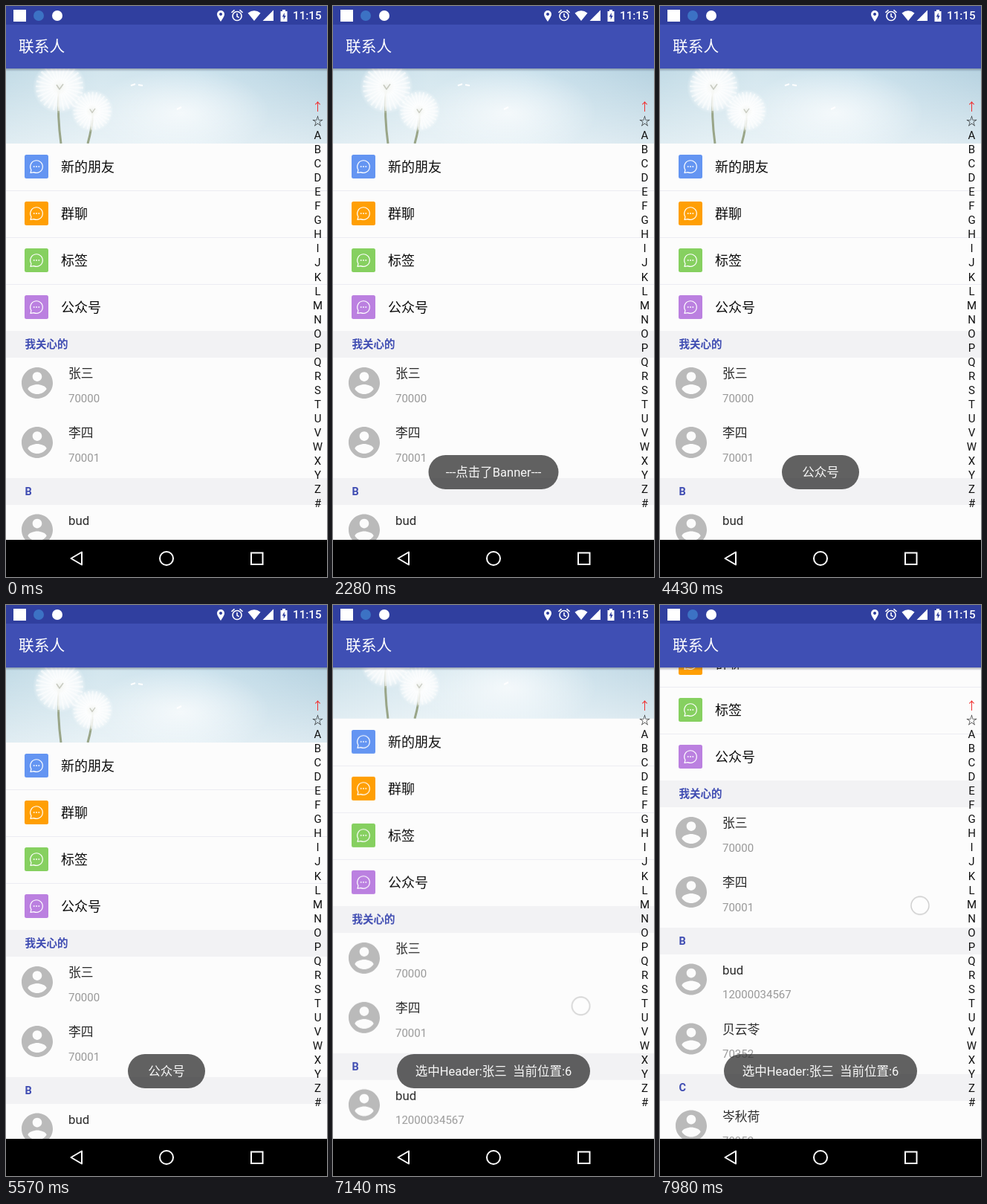
These frames come from a looping animation (432x768 px, 8000 ms). An HTML page:

```html
<!DOCTYPE html>
<html lang="zh-CN">
<head>
<meta charset="utf-8">
<title>联系人</title>
<style>
html, body { margin: 0; width: 100%; height: 100%; overflow: hidden; background: #000; }
svg#stage { display: block; width: 100vw; height: 100vh; }
text { font-family: Roboto, "Noto Sans CJK SC", "Noto Sans CJK", sans-serif; white-space: pre; }
.mid { text-anchor: middle; }
.list, .glow, .wave, .toast, .finger { animation: 8s linear infinite; }

.list { animation-name: scroll; }
@keyframes scroll {
  0%, 88.5% { transform: none; animation-timing-function: cubic-bezier(.333, .85, .667, .94); }
  100% { transform: translateY(-201.8px); }
}

/* Row feedback: a flat tint plus a growing circle */
.glow { animation-name: glow; opacity: 0; }
.wave { animation-name: wave; opacity: 0; }
@keyframes glow {
  0% { opacity: 0; }
  1%, 3.75% { opacity: 1; }
  6.25%, 100% { opacity: 0; }
}
@keyframes wave {
  0% { transform: scale(0); opacity: 1; }
  1.9% { opacity: 1; }
  5% { opacity: 0; }
  6.25%, 100% { transform: scale(1.8); opacity: 0; }
}

.toast { opacity: 0; }
.t1 { animation-name: toast1; }
.t2 { animation-name: toast2; }
.t3 { animation-name: toast3; }
@keyframes toast1 {
  0%, 12.5% { opacity: 0; animation-timing-function: cubic-bezier(.2, .6, .5, 1); }
  17.5%, 35.43% { opacity: 1; }
  35.44%, 100% { opacity: 0; }
}
@keyframes toast2 {
  0%, 35.43% { opacity: 0; transform: translateX(-36px); }
  35.44% { opacity: 1; transform: translateX(-36px); animation-timing-function: cubic-bezier(.22, 1, .36, 1); }
  40.44%, 76.8% { opacity: 1; transform: none; }
  76.81%, 100% { opacity: 0; transform: none; }
}
@keyframes toast3 {
  0%, 76.8% { opacity: 0; transform: translateX(78px); }
  76.81% { opacity: 1; transform: translateX(78px); animation-timing-function: cubic-bezier(.22, 1, .36, 1); }
  81.81%, 100% { opacity: 1; transform: none; }
}

.finger { animation-name: finger; opacity: 0; }
@keyframes finger {
  0%, 34% { opacity: 0; transform: translate(236px, 405px); }
  34.01%, 35.2% { opacity: 1; transform: translate(236px, 405px); }
  35.21%, 75.3% { opacity: 0; transform: translate(267px, 513px); }
  75.31%, 76.5% { opacity: 1; transform: translate(267px, 513px); }
  76.51%, 86.7% { opacity: 0; transform: translate(325px, 610px); }
  86.71%, 87.3% { opacity: 1; transform: translate(325px, 610px); animation-timing-function: cubic-bezier(.333, .85, .667, .94); }
  100% { opacity: 1; transform: translate(350px, 403.5px); }
}
</style>
</head>
<body>
<svg id="stage" viewBox="0 0 432 768">
  <defs>
    <linearGradient id="sky">
      <stop offset="0" stop-color="#c2dbe6"/>
      <stop offset=".3" stop-color="#d3e6ee"/>
      <stop offset=".6" stop-color="#cbe2ed"/>
      <stop offset="1" stop-color="#b6d2e0"/>
    </linearGradient>
    <linearGradient id="mist" x2="0" y2="1">
      <stop offset="0" stop-color="#fff" stop-opacity="0"/>
      <stop offset="1" stop-color="#fff" stop-opacity=".5"/>
    </linearGradient>
    <radialGradient id="puff">
      <stop offset="0" stop-color="#f1f3ee"/>
      <stop offset=".3" stop-color="#fff" stop-opacity=".9"/>
      <stop offset=".7" stop-color="#fff" stop-opacity=".7"/>
      <stop offset="1" stop-color="#fff" stop-opacity="0"/>
    </radialGradient>
    <radialGradient id="haze">
      <stop offset="0" stop-color="#fff" stop-opacity=".7"/>
      <stop offset="1" stop-color="#fff" stop-opacity="0"/>
    </radialGradient>
    <linearGradient id="shade" x2="0" y2="1">
      <stop offset="0" stop-color="#333a50" stop-opacity=".4"/>
      <stop offset="1" stop-color="#333a50" stop-opacity="0"/>
    </linearGradient>
    <g id="bubble" fill="none" stroke="#fff" stroke-width="1.2">
      <path d="M-7 4.5A8.3 8.3 0 1 1-3.5 7.6L-8 8.3Z" stroke-linejoin="round"/>
      <path d="M-4.2 0h1.8M-.9 0h1.8M2.4 0h1.8" stroke-width="1.5"/>
    </g>
    <g id="dandelion">
      <circle r="36" fill="url(#puff)"/>
      <circle r="18" fill="none" stroke="#fff" stroke-opacity=".55" stroke-width="28" stroke-dasharray="1.5 2.5"/>
      <path d="M-4-3L0 3L5-4" fill="none" stroke="#a9ab9c" stroke-width="1.5" opacity=".6"/>
    </g>
    <path id="person" fill-rule="evenodd" transform="scale(2.1) translate(-12 -12)" d="M12 2C6.48 2 2 6.48 2 12s4.48 10 10 10 10-4.48 10-10S17.52 2 12 2zm0 3c1.66 0 3 1.34 3 3s-1.34 3-3 3-3-1.34-3-3 1.34-3 3-3zm0 14.2c-2.5 0-4.71-1.28-6-3.22.03-1.99 4-3.08 6-3.08 1.99 0 5.97 1.09 6 3.08-1.29 1.94-3.5 3.22-6 3.22z"/>
  </defs>

  <rect width="432" height="768" fill="#fcfcfc"/>
  <g class="list">
    <svg y="84" width="432" height="101">
      <rect width="432" height="101" fill="url(#sky)"/>
      <rect width="432" height="101" fill="url(#mist)"/>
      <ellipse cx="235" cy="60" rx="120" ry="60" fill="url(#haze)"/>
      <g fill="none" stroke="#99a588" stroke-width="3">
        <path d="M71 30Q69 65 74 101"/>
        <path d="M117 58Q116 80 110 101"/>
      </g>
      <use href="#dandelion" x="72" y="25"/>
      <use href="#dandelion" transform="translate(116 57) scale(.8)"/>
      <path d="M168 23l6-2M178 22l6 1M230 55l6-3" stroke="#fff" stroke-width="2"/>
    </svg>
    <g id="rows"></g>
  </g>

  <g id="index"></g>
  <g id="toasts"></g>

  <rect y="84" width="432" height="4" fill="url(#shade)"/>
  <rect y="25" width="432" height="59" fill="#3f4fb4"/>
  <rect width="432" height="25" fill="#303f9f"/>
  <g id="bar" fill="#fff">
    <rect x="10" y="5" width="17" height="16"/>
    <circle cx="44" cy="13" r="7" fill="#3c72c4"/>
    <circle cx="69" cy="13" r="7"/>
    <path fill-rule="evenodd" d="M289 21C285 15 284 13 284 11a5 5 0 0 1 10 0C294 13 293 15 289 21ZM289 9a2 2 0 1 0 .01 0Z"/>
    <g fill="none" stroke="#fff" stroke-width="1.6">
      <circle cx="311" cy="13.5" r="6"/>
      <path d="M311 10v4l2.6 1.6M303.5 8.8l4-3.4M318.5 8.8l-4-3.4"/>
    </g>
    <path d="M325.5 9.5Q334 3 342.5 9.5L334 20Z"/>
    <path d="M345.5 20L360 5.5V20Z"/>
    <path fill-rule="evenodd" d="M369.5 7h2.5V5h4v2h2.5v14h-9ZM374.7 9l-3 5.5h2v4l3-5.5h-2Z"/>
  </g>

  <rect y="718" width="432" height="50"/>
  <g fill="none" stroke="#fff" stroke-width="2">
    <path d="M87.5 743L102 734.5V751.5Z" stroke-linejoin="round"/>
    <circle cx="216" cy="743" r="9"/>
    <rect x="330" y="735.5" width="15.5" height="15.5"/>
  </g>

  <g class="finger">
    <circle r="12" fill="#fff" fill-opacity=".3" stroke="#cbcbcb" stroke-width="1.4"/>
  </g>
</svg>

<script>
const loop = 8000;
const at = id => document.getElementById(id);

// Text placed by its vertical centre
const label = (x, cy, size, str, attrs = '') =>
  `<text x="${x}" y="${cy + size * 0.36}" font-size="${size}" ${attrs}>${str}</text>`;

// The negative delay puts the beginning of the cycle at the start time
const ripple = (y, height, x, start) => {
  const delay = `style="animation-delay:${start - loop}ms"`;
  return `<svg y="${y}" width="432" height="${height}">
    <rect class="glow" ${delay} width="432" height="${height}" fill="#eeeeee"/>
    <g transform="translate(${x} ${height / 2})">
      <circle class="wave" ${delay} r="100" fill="#e3e3e3"/>
    </g></svg>`;
};

const menuItem = (y, name, color) => `
  <rect x="25" y="${y + 15}" width="32" height="32" rx="2.5" fill="${color}"/>
  <use href="#bubble" x="41" y="${y + 31}"/>
  ${label(74, y + 31.5, 18, name, 'fill="#0c0c0c"')}
  <path d="M0 ${y + 63.5}H432" stroke="#ececf2"/>`;

const section = (y, name) => `
  <rect y="${y}" width="432" height="36" fill="#f2f2f4"/>
  ${label(25.5, y + 18, 14.5, name, 'font-weight="700" fill="#3f4cb2"')}`;

const contact = (y, name, number) => `
  <use href="#person" x="42" y="${y + 34}" fill="#bababa"/>
  ${label(84, y + 21, 16.8, name, 'fill="#2b2b2b"')}
  ${label(84, y + 54.5, 15, number, 'fill="#999"')}`;

const menu = [['新的朋友', '#6495f2'], ['群聊', '#ff9f04'], ['标签', '#86d060'], ['公众号', '#bb80e0']];
at('rows').innerHTML =
  ripple(374, 63, 236, 2830) + ripple(473, 80, 267, 6130) +
  menu.map(([name, color], i) => menuItem(185 + 63 * i, name, color)).join('') +
  section(437, '我关心的') + contact(473, '张三', '70000') + contact(553, '李四', '70001') +
  section(635, 'B') + contact(670.5, 'bud', '12000034567') + contact(750.5, '贝云苓', '70352') +
  section(832, 'C') + contact(867.5, '岑秋荷', '70352');

at('index').innerHTML = [...'↑☆ABCDEFGHIJKLMNOPQRSTUVWXYZ#'].map((ch, i) =>
  label(419.5, 135.4 + 19.06 * i, 15, ch, `class="mid" fill="${i ? '#111' : '#f03030'}"`)).join('');

const toasts = [['---点击了Banner---', 175], ['公众号', 104], ['选中Header:张三  当前位置:6', 260]];
at('toasts').innerHTML = toasts.map(([str, width], i) => `
  <g class="toast t${i + 1}">
    <rect x="${216 - width / 2}" y="604" width="${width}" height="46" rx="23" fill="#323232" fill-opacity=".77"/>
    ${label(216, 627.5, 16.5, str, 'class="mid" fill="#f8f8f8"')}
  </g>`).join('');

at('bar').innerHTML += label(386, 13, 15.2, '11:15', 'font-weight="500"') + label(17, 55, 20.7, '联系人');
</script>
</body>
</html>
```
